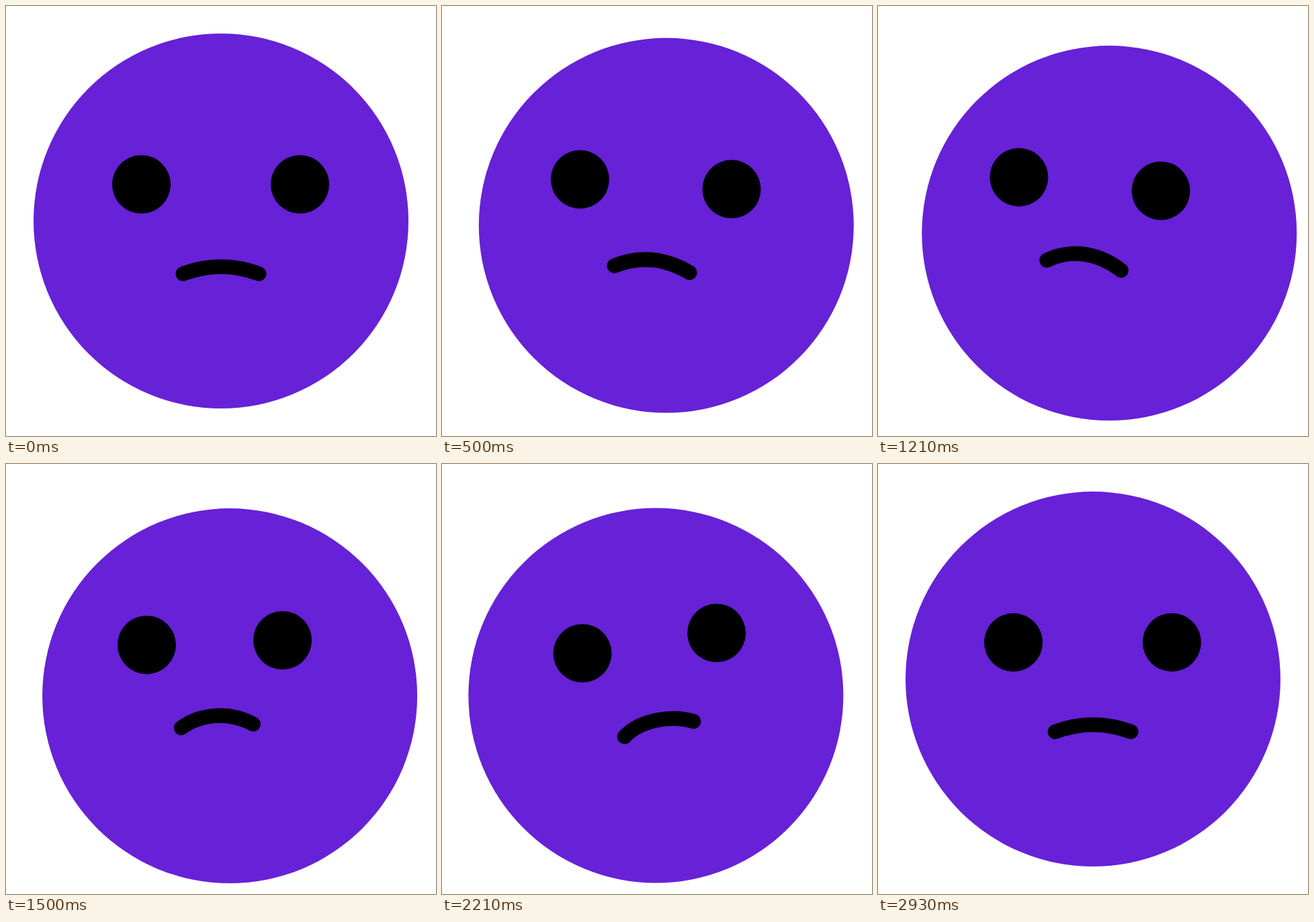
Recreate the animation shown at these times as an HTML page. Size 640 by 640 pixels, loop 3 s.

```html
<!DOCTYPE html>
<html lang="en">
<head>
<meta charset="utf-8">
<title>Wobbling face</title>
<style>
  html, body { margin: 0; width: 100%; height: 100%; overflow: hidden; background: #fff; }
  svg { display: block; width: 100%; height: 100%; }
</style>
</head>
<body>
<svg viewBox="0 0 640 640">
  <circle id="head" r="279" fill="#6721d7"/>
  <circle id="leftEye" r="43.5"/>
  <circle id="rightEye" r="43.5"/>
  <path id="mouth" fill="none" stroke="#000" stroke-width="22" stroke-linecap="round"/>
</svg>
<script>
const LOOP = 3000, FPS = 14;
const POSE_TIMES = [0, 1000, 1950, 2972];
const $ = id => document.getElementById(id);

// The head follows a curved triangle, one path per leg.
const headLegs = [
  'M320 320C324.3 322.6 345.8 330.7 345.8 335.4',
  'M345.8 335.4C345.8 340.1 324.3 350.6 320 348',
  'M320 348C315.7 345.4 320 324.7 320 320'
].map(d => {
  const path = document.createElementNS('http://www.w3.org/2000/svg', 'path');
  path.setAttribute('d', d);
  return path;
});

// Three poses per point; bends push the middle of each leg off the straight line.
const leftEye = {
  poses: [[201.5, 265.5], [210.1, 251.5], [210.5, 284]],
  bends: [[-0.4, -0.4], [-0.9, 0], [-0.5, 0.7]]
};
const rightEye = {
  poses: [[437.5, 265.5], [423.6, 278.1], [403.9, 250]],
  bends: [[0.5, 0.8], [-1.3, -0.4], [0.1, -1.3]]
};
const mouth = [
  { poses: [[263.5, 398.5], [249.4, 374.9], [273, 407]], bends: [[0, 0], [-1.5, 0.3], [0, 0]] },
  { poses: [[301.2, 384.5], [284, 360], [295, 380]] },
  { poses: [[338.8, 384.5], [323, 364.5], [343, 371.5]] },
  { poses: [[376.5, 398.5], [360.5, 395], [374, 380.5]] }
];

// Cubic ease-in-out with handles at 0.42 and 0.58.
function ease(x) {
  let low = 0, high = 1;
  for (let i = 0; i < 24; i++) {
    const s = (low + high) / 2, r = 1 - s;
    if (3 * r * r * s * 0.42 + 3 * r * s * s * 0.58 + s ** 3 < x) low = s;
    else high = s;
  }
  return low * low * (3 - 2 * low);
}

function pointAt({ poses, bends }, leg, u) {
  const from = poses[leg], to = poses[(leg + 1) % 3];
  const bend = bends ? bends[leg] : [0, 0];
  return from.map((v, i) => v + (to[i] - v) * u + 4 * u * (1 - u) * bend[i]);
}

function place(id, [x, y]) {
  $(id).setAttribute('cx', x);
  $(id).setAttribute('cy', y);
}

function draw(now) {
  // Poses advance in steps, with starts rounded to the nearest 10 ms.
  const step = Math.floor((now % LOOP + 5) * FPS / 1000) % (LOOP * FPS / 1000);
  const t = step * 1000 / FPS;
  const leg = t < POSE_TIMES[1] ? 0 : t < POSE_TIMES[2] ? 1 : 2;
  const span = POSE_TIMES[leg + 1] - POSE_TIMES[leg];
  const u = ease(Math.min(1, (t - POSE_TIMES[leg]) / span));

  const path = headLegs[leg];
  const head = path.getPointAtLength(path.getTotalLength() * u);
  place('head', [head.x, head.y]);
  place('leftEye', pointAt(leftEye, leg, u));
  place('rightEye', pointAt(rightEye, leg, u));
  const [start, ...curve] = mouth.map(point => pointAt(point, leg, u));
  $('mouth').setAttribute('d', `M${start}C${curve.join(' ')}`);
}

function tick() {
  draw(performance.now());
  requestAnimationFrame(tick);
}
tick();
</script>
</body>
</html>
```
